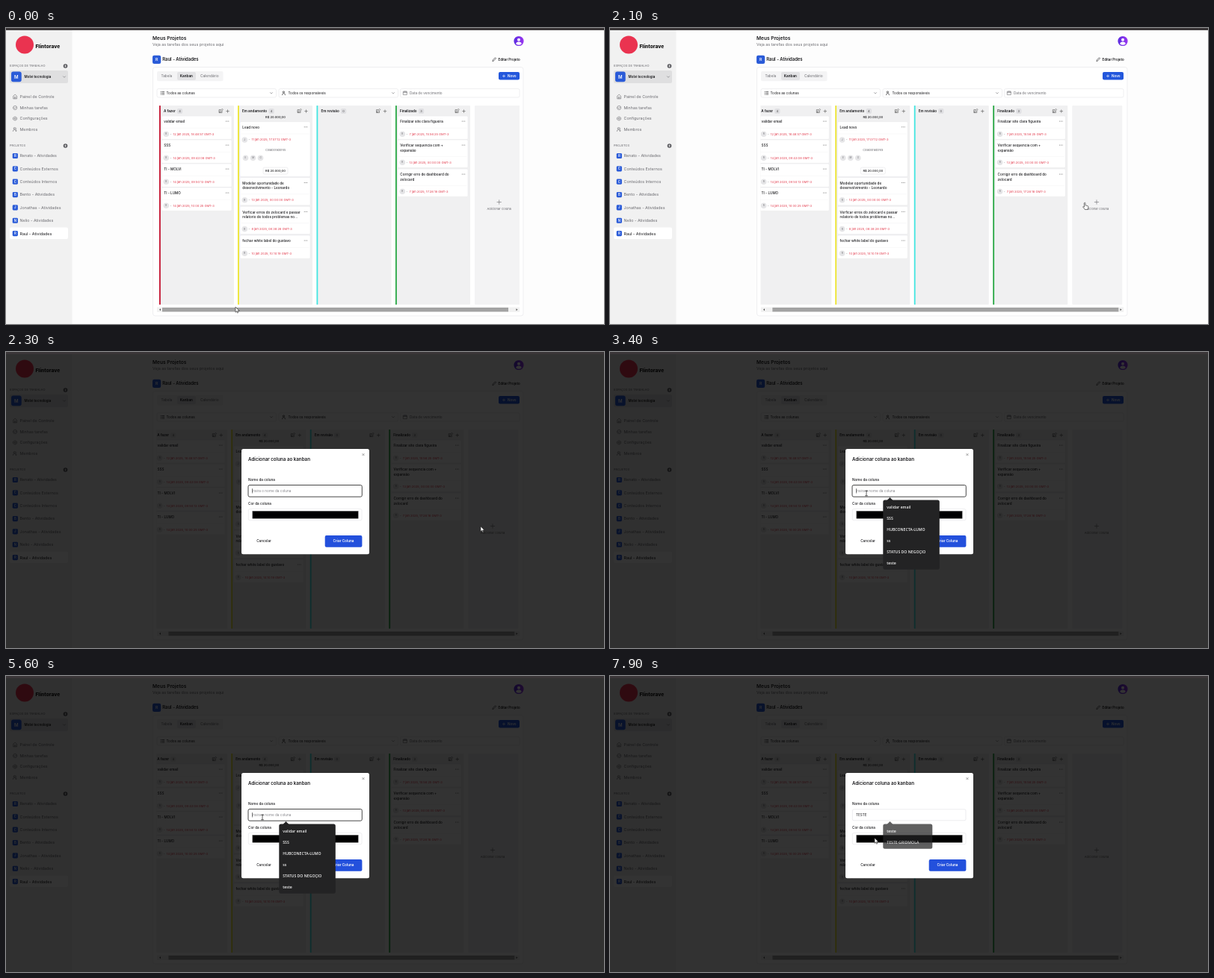
Animation, 800 px wide and 397 px high, one loop 8 s. Source, as an HTML page:

```html
<!DOCTYPE html>
<html lang="pt">
<head>
<meta charset="utf-8">
<title>Kanban</title>
<style>
html, body { margin: 0; width: 100%; height: 100%; overflow: hidden; background: #fdfdfd; }
svg { display: block; width: 100%; height: 100%; }
text { font-family: Inter, Roboto, sans-serif; white-space: pre; }
.menu text { font-family: "Open Sans", "Noto Sans", sans-serif; font-weight: 600; }
</style>
</head>
<body>
<svg id="stage" viewBox="0 0 800 397"></svg>
<script>
const BLUE = '#2a5bd8', INK = '#18181b', GRAY = '#6b6b70';

const rect = (x, y, w, h, fill, r = 0, extra = '') =>
  `<rect x="${x}" y="${y}" width="${w}" height="${h}" rx="${r}" fill="${fill}" ${extra}/>`;
const box = (x, y, w, h, stroke, fill = '#fff', sw = .6, r = 2) =>
  rect(x, y, w, h, fill, r, `stroke="${stroke}" stroke-width="${sw}"`);
const dot = (x, y, r, fill) => `<circle cx="${x}" cy="${y}" r="${r}" fill="${fill}"/>`;
const line = (d, stroke = GRAY, sw = .6, fill = 'none') =>
  `<path d="${d}" fill="${fill}" stroke="${stroke}" stroke-width="${sw}" stroke-linecap="round" stroke-linejoin="round"/>`;
// y is the middle of the capitals
const text = (x, y, s, size, fill = INK, weight = 400, anchor = 'start') =>
  `<text x="${x}" y="${y + size * .36}" font-size="${size}" fill="${fill}" font-weight="${weight}" text-anchor="${anchor}">${s}</text>`;
const plus = (x, y, r, color = GRAY) => line(`M${x - r} ${y}h${2 * r}M${x} ${y - r}v${2 * r}`, color);
const badge = (x, y, size, letter, font) =>
  rect(x, y, size, size, BLUE, size * .2) +
  text(x + size / 2, y + size / 2, letter, font, '#fff', 600, 'middle');
const chevron = (x, y) => line(`M${x - 1.5} ${y - .7}l1.5 1.5l1.5 -1.5`);
const person = (x, y, c = GRAY) => line(`M${x - 2} ${y + 2.5}q0 -2.3 2 -2.3t2 2.3M${x - 1.1} ${y - 1.4}a1.1 1.1 0 1 0 2.2 0a1.1 1.1 0 1 0 -2.2 0`, c);
const pencil = (x, y, c = INK) => line(`M${x - 2} ${y + 2}l.5 -1.6l3 -3l1.1 1.1l-3 3z`, c);

function sidebar() {
  const nav = ['Painel de Controle', 'Minhas tarefas', 'Configurações', 'Membros'];
  const projects = ['Renato - Atividades', 'Conteúdos Externos', 'Conteúdos Internos', 'Bento - Atividades',
    'Jonathas - Atividades', 'Nelio - Atividades', 'Raul - Atividades'];
  const icons = [
    line('M9.7 94.5v-3.3l2.4 -2l2.4 2v3.3zM11.4 94.5v-2h1.4v2'),
    line('M9.5 107a2.6 2.6 0 1 0 5.2 0a2.6 2.6 0 1 0 -5.2 0M11 107l.9 .9l1.6 -1.7'),
    line('M9.8 120.2l2.3 -1.3l2.3 1.3v2.6l-2.3 1.3l-2.3 -1.3zM11.2 121.5a.9 .9 0 1 0 1.8 0a.9 .9 0 1 0 -1.8 0'),
    person(11.3, 136) + line('M13.8 138.5q.8 -1.5 -.6 -2.3M13 133.6q1.5 .8 .3 2')
  ];
  const add = y => dot(79.5, y, 2.8, '#55555a') + plus(79.5, y, 1.3, '#fff');
  return rect(0, 3, 88.5, 394, '#f1f1f1') + dot(25, 22.5, 12, '#ea3350') +
    text(39.5, 24.5, 'Flintorave', 6.6, '#111', 800) +
    text(5, 51, 'ESPAÇOS DE TRABALHO', 4, GRAY) + add(51) +
    rect(5, 57, 78, 17, '#dfdfe0', 2) + badge(7, 58.5, 13.7, 'M', 6) +
    text(24.5, 65.5, 'Molvi tecnologia', 4.5, INK, 600) + chevron(78, 65.5) +
    nav.map((s, i) => icons[i] + text(18.5, [92, 107, 121.5, 136][i], s, 5.35, GRAY)).join('') +
    text(5, 158, 'PROJETOS', 4, GRAY) + add(158) +
    rect(5, 267.5, 78, 15.5, '#fff', 2) +
    projects.map((s, i) => {
      const y = 171.5 + i * 17.35;
      return badge(8.7, y - 3.6, 7.2, s[0], 4.3) + text(18.5, y, s, 5.35, i == 6 ? INK : GRAY);
    }).join('');
}

function header() {
  const field = (x, s, icon, color) => box(x, 81.5, 159.5, 11.5, '#e4e4e7') + icon + text(x + 12.5, 87.3, s, 4.63, color);
  return text(196, 13.5, 'Meus Projetos', 6.55, INK, 600) +
    text(196, 22, 'Veja as tarefas dos seus projetos aqui', 5.33, GRAY) +
    dot(686, 17.5, 6.6, 'url(#purple)') + dot(686, 15.8, 2, '#fff') +
    '<path d="M682.3 21.5q0 -3 3.7 -3t3.7 3q-3.7 2.5 -7.4 0z" fill="#fff"/>' +
    badge(196, 36.7, 11.2, 'R', 5) + text(209.3, 42.3, 'Raul - Atividades', 5.9, INK, 600) +
    pencil(653, 42.3) + text(658.5, 42.3, 'Editar Projeto', 4.5, INK, 600) +
    box(196.5, 52.5, 495.5, 333.5, '#e9e9eb', '#fff', .7, 3) +
    rect(202, 58, 88.5, 13.3, '#f4f4f5', 2) + rect(229, 59, 25, 11, '#e3e3e5', 2) +
    text(207.5, 64.7, 'Tabela', 4.7, GRAY) + text(232.8, 64.7, 'Kanban', 4.6, INK, 600) + text(260, 64.7, 'Calendário', 4.8, GRAY) +
    rect(659, 59, 28, 10.6, '#2357dc', 2) + plus(666, 64.4, 1.6, '#fff') + text(671, 64.4, 'Novo', 4.6, '#fff', 600) +
    field(202, 'Todos as colunas', line('M207 85.5h.3M208.7 85.5h3M207 87.3h.3M208.7 87.3h3M207 89.1h.3M208.7 89.1h3', INK) + chevron(355, 87.3), INK) +
    field(365, 'Todos os responsáveis', person(371.5, 87.3, INK) + chevron(518, 87.3), INK) +
    field(527.5, 'Data de vencimento', line('M531.7 85.2h4.6v4.4h-4.6zM531.7 86.6h4.6M533 84.6v1M535 84.6v1'), GRAY);
}

const avatar = (x, y, s) => dot(x, y, 3.8, '#e5e5e7') + text(x, y, s, 3, GRAY, 400, 'middle');
const dots = (x, y) => [-1.8, 0, 1.8].map(d => dot(x + d, y, .5, '#666')).join('');

function card(x, top, title, when, who = 'R', height) {
  const rows = title.split('|'), dy = top + 24.3 + (rows.length - 1) * 6;
  return box(x + 3, top, 94, height || dy + 7 - top, '#e6e6e8', '#fff', .5, 1.5) +
    rows.map((s, i) => text(x + 6.3, top + 7.6 + i * 6.6, s, 4.6, INK, 450)).join('') +
    dots(x + 91, top + 7) + line(`M${x + 5} ${dy - 8}h90`, '#f1f1f2', .5) +
    avatar(x + 9.3, dy, who) + text(x + 14.5, dy, '-', 4, GRAY) +
    text(x + 18.5, dy, when.replace(' ', ' jan 2025, ') + ' GMT-3', 4.05, '#e23a4c');
}

function column(x, color, title, count, chip, cards) {
  return rect(x, 104, 100, 267, '#f0f0f1', 1) + cards +
    rect(x, 104, 1.8, 267, color, .6) + text(x + 6, 111.6, title, 4.6, INK, 600) +
    rect(x + chip - 3.7, 108, 7.4, 7, '#e0e0e3', 2) + text(x + chip, 111.5, count, 4, '#444', 400, 'middle') +
    line(`M${x + 82} 109.6h-2v4h4v-2`, '#555') + pencil(x + 82.7, 111, '#555') + plus(x + 91.5, 111.6, 1.8, '#555');
}

function board() {
  const money = y => text(360.5, y, 'R$ 20.000,00', 4.1, INK, 500, 'middle');
  return column(205, '#c4122f', 'A fazer', 4, 27.5,
      card(205, 118, 'validar email', '12 18:48:57') + card(205, 150, 'SSS', '14 09:43:08') +
      card(205, 182, 'TI - MOLVI', '14 09:50:13') + card(205, 214, 'TI - LUMO', '14 10:00:25')) +
    column(310, '#eee62f', 'Em andamento', 4, 45,
      money(120) + card(310, 125.7, 'Lead novo', '11 17:07:12', 'J', 73.5) +
      text(360.5, 164, 'Colaboradores', 3.9, GRAY, 400, 'middle') +
      avatar(320.5, 174.3, 'E') + avatar(330.5, 174.3, 'M') + avatar(340.5, 174.3, 'G') +
      box(344, 187, 33, 9, '#e4e4e7') + money(191.6) +
      card(310, 200.5, 'Modelar oportunidade de|desenvolvimento - Leonardo', '13 00:00:00') +
      card(310, 239.3, 'Verficar erros do zelocard e passar|relatorio de todos problemas no...', '8 08:38:28') +
      card(310, 278, 'fechar white label do gustavo', '10 10:10:19')) +
    column(415.5, '#42e6e2', 'Em revisão', 0, 36, '') +
    column(521, '#27a844', 'Finalizado', 3, 34.5,
      card(521, 118, 'Finalizar site clara figueira', '7 15:56:25') +
      card(521, 150, 'Verificar sequencia com +|expansão', '13 00:00:00') +
      card(521, 189, 'Corrigir erro de dashboard do|zelocard', '7 17:28:18')) +
    rect(627, 104, 67, 267, '#f3f3f4', 1) + plus(659.7, 233.5, 2.7) +
    text(659.7, 242.5, 'Adicionar coluna', 4.1, GRAY, 400, 'middle');
}

function modal(typed, focused, caret) {
  return rect(315, 130, 171, 141.3, '#fff', 2.5) +
    line('M476.8 136.4l2.4 2.4M479.2 136.4l-2.4 2.4', '#666') +
    text(324, 143.6, 'Adicionar coluna ao kanban', 6.2, INK, 600) +
    text(324, 171.7, 'Nome da coluna', 4.65, INK, 500) +
    (focused ? box(324, 178.5, 152.3, 15.7, '#333', '#fff', .9) : box(324.3, 178.8, 151.7, 15, '#e0e0e4')) +
    text(329, 186.3, typed || 'Insira o nome da coluna', 4.67, typed ? INK : '#85858a') +
    (caret ? rect(329 + typed.length * 2.95, 183, .5, 6.5, '#111') : '') +
    text(324, 203.5, 'Cor da coluna', 4.65, INK, 500) +
    box(324.3, 210.5, 151.7, 15.3, '#e4e4e7') + box(329.8, 213.3, 141.4, 10, '#777', '#000', .5, 0) +
    text(345, 253.8, 'Cancelar', 4.6, INK, 500, 'middle') +
    rect(426.7, 246, 49.7, 15.8, '#2350dc', 2) + text(451.5, 253.8, 'Criar Coluna', 4.65, '#fff', 600, 'middle');
}

function menu(items, width, opacity) {
  return `<g class="menu" opacity="${opacity}"><path d="M370.5 199l4 -4l4 4z" fill="#232324"/>` +
    rect(365.3, 198.5, width, items.length * 15 + 3.3, '#232324', 2.5) +
    items.map((s, i) => text(370.3, 208 + i * 15, s, 5.15, '#f2f2f2')).join('') + '</g>';
}

function pointer(kind, x, y) {
  const shapes = {
    arrow: line('M0 0v6.8l1.6 -1.5l1 2.4l1.1 -.5l-1 -2.3h2.2z', '#222', .6, '#fff'),
    hand: line('M-.6 .6q.8 -1.2 1.5 0v3.2l3.2 .8q.9 .3 .8 1.4l-.6 3.4h-4l-2.7 -3.6q.2 -1.2 1.8 0z', '#222', .6, '#fff'),
    beam: line('M-1.5 -3.3h3M0 -3.3v6.6M-1.5 3.3h3', '#222', .7)
  };
  return `<g transform="translate(${x} ${y})">${shapes[kind]}</g>`;
}

// time, x, y of the mouse
const path = [[0, 307, 374.5], [200, 307, 374.5], [1100, 433, 388], [1400, 440, 388], [2000, 635, 234],
  [2400, 635, 234], [3000, 343, 189.5], [7200, 343, 189.5], [7700, 354, 217.5], [8000, 354, 217.5]];

function mouse(t) {
  const i = path.findIndex(p => p[0] > t), a = path[i - 1], b = path[i];
  const u = (t - a[0]) / (b[0] - a[0]), e = u * u * (3 - 2 * u);
  return [a[1] + (b[1] - a[1]) * e, a[2] + (b[2] - a[2]) * e];
}

const stage = document.getElementById('stage');
stage.innerHTML = `<defs>
  <linearGradient id="purple" x2="1"><stop stop-color="#5a2be0"/><stop offset="1" stop-color="#9a35f0"/></linearGradient>
  <clipPath id="view"><rect x="201.5" y="103" width="485.5" height="269"/></clipPath></defs>` +
  rect(0, 0, 800, 397, '#fdfdfd') + sidebar() + header() +
  `<g clip-path="url(#view)"><g id="board">${board()}</g></g>` +
  rect(202, 374.5, 485, 6.5, '#f1f1f1') +
  '<path d="M207 376.3v3l-2 -1.5zM682.5 376.3v3l2 -1.5z" fill="#555"/>' +
  rect(209, 375, 463, 5.5, '#a3a3a3', 0, 'id="thumb"') +
  rect(0, 3, 800, 394, '#000', 0, 'id="shade"') +
  rect(0, 0, 800, 3, '#3a3638') +
  '<g id="dialog"></g><g id="top"></g>';
const [boardEl, thumb, shade, dialog, topEl] =
  ['board', 'thumb', 'shade', 'dialog', 'top'].map(id => document.getElementById(id));

const history = ['validar email', 'SSS', 'HUBCONECTA-LUMO', 'ss', 'STATUS DO NEGOÇIO', 'teste'];
const matches = ['teste', 'TESTE GRIDMOLA'];

function draw(t) {
  const [x, y] = mouse(t);
  const scroll = t < 1400 ? Math.min(8.7, Math.max(0, x - 307)) : 8.7;
  boardEl.setAttribute('transform', `translate(${-scroll} 0)`);
  thumb.setAttribute('x', 209 + scroll * .96);
  thumb.setAttribute('fill', t >= 200 && t < 1300 ? '#787878' : '#a3a3a3');

  const open = Math.min(1, Math.max(0, (t - 2100) / 170));
  const typed = 'TESTE'.slice(0, Math.max(0, Math.floor((t - 5900) / 150) + 1));
  const focused = t < 7900, caret = focused && Math.floor((t - 2200) / 500) % 2 == 0;
  shade.setAttribute('opacity', .8 * open);
  const scale = .97 + .03 * open;
  dialog.setAttribute('opacity', open < 1 ? open * .87 : 1);
  dialog.setAttribute('transform', `translate(400.5 ${200.6 + (1 - open) * 1.3}) scale(${scale}) translate(-400.5 -200.6)`);
  dialog.innerHTML = open ? modal(typed, focused, caret) : '';

  const list = t < 3200 ? '' : typed ? menu(matches, 66, focused ? 1 : .72) : menu(history, 75.5, 1);
  const inField = open && x > 324 && x < 476 && y > 178 && y < 194.5;
  const kind = inField ? 'beam' : !open && x > 617 && y < 371 ? 'hand' : 'arrow';
  topEl.innerHTML = list + pointer(kind, x, y);
}

let last = -1;
function tick(now) {
  const t = Math.floor(now % 8000 / 100) * 100;
  if (t != last) draw(last = t);
  requestAnimationFrame(tick);
}
draw(0);
requestAnimationFrame(tick);
</script>
</body>
</html>
```
